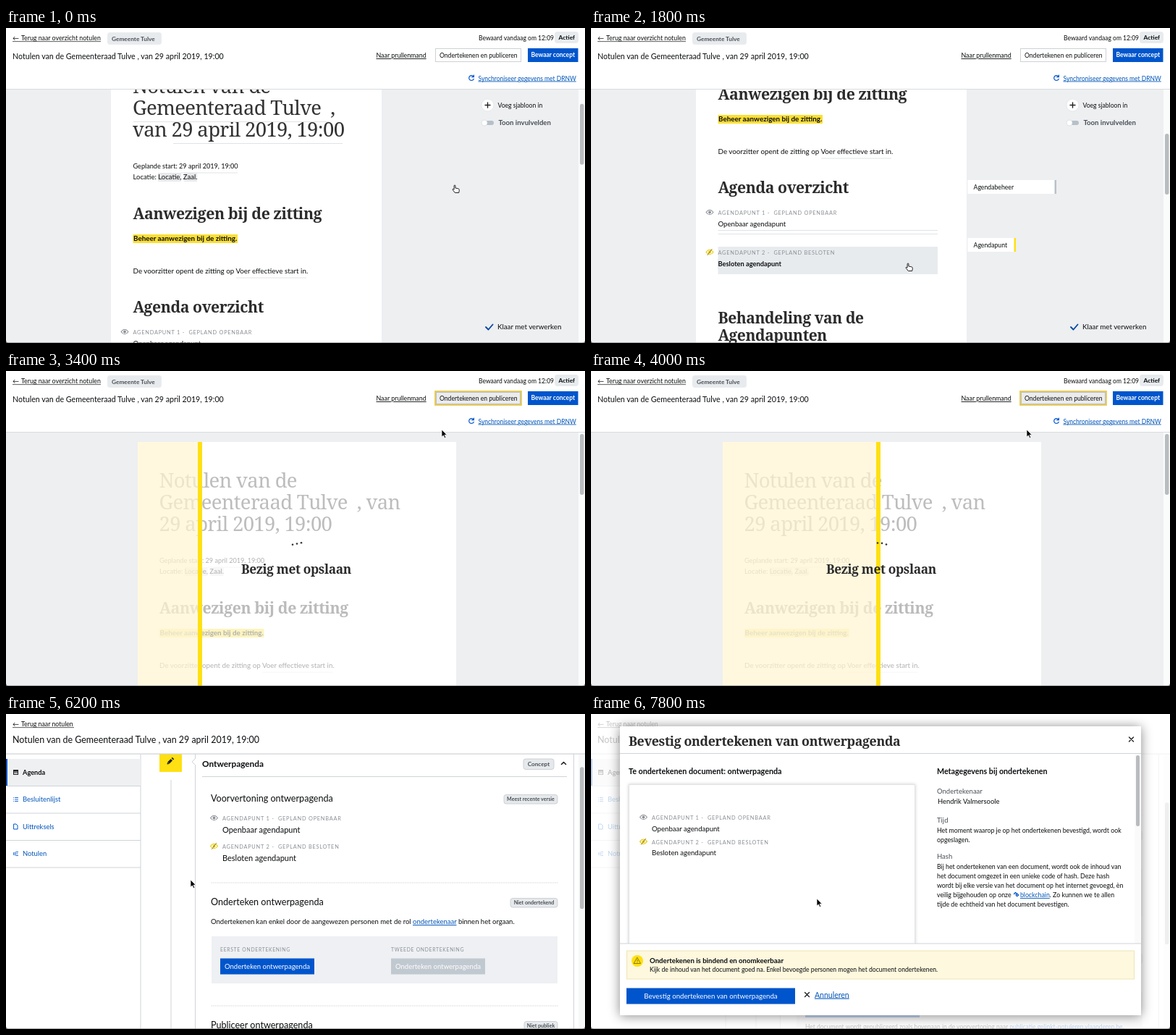
These frames come from a looping animation (800 px wide and 435 px high, 8 s). An HTML page:

```html
<!DOCTYPE html>
<html lang="nl">
<head>
<meta charset="utf-8">
<title>Notulen</title>
<style>
  html, body { margin: 0; width: 100%; height: 100%; overflow: hidden; background: #fff; }
  svg { display: block; width: 100vw; height: 100vh; }
  text { font-family: Lato, sans-serif; fill: #0c0e10; white-space: pre; }
  .b { font-weight: 700; }
  .serif { font-family: "Noto Serif", serif; font-weight: 700; letter-spacing: -.02em; fill: #2b2b2b; }
  .light { font-family: "Noto Serif", serif; font-weight: 200; letter-spacing: -.025em; fill: #333; }
  .caps { font-size: 7.4px; letter-spacing: .75px; fill: #8b9096; }
  .small { font-size: 6.8px; letter-spacing: .7px; }
  .link { fill: #0055b8; }
  .u { text-decoration: underline; }
  .white { fill: #fff; }
  .grey { fill: #4a5056; }
  .line { fill: none; stroke-linecap: round; stroke-linejoin: round; }
</style>
</head>
<body>
<svg id="stage" viewBox="0 0 800 435" preserveAspectRatio="none"></svg>
<script>
const BLUE = '#0055cc', YELLOW = '#ffe012', GREY = '#edeff1', RULE = '#cfd4d9', FIELD = '#dfe3e6';
const LOOP = 8000, STEP = 200;

const text = (x, y, size, str, cls = '') =>
  `<text x="${x}" y="${y}" ${size ? `font-size="${size}"` : ''} class="${cls}">${str}</text>`;
const rect = (x, y, w, h, fill, extra = '') =>
  `<rect x="${x}" y="${y}" width="${w}" height="${h}" fill="${fill}" ${extra}/>`;
const path = (d, stroke, width = 1, extra = '') =>
  `<path class="line" d="${d}" stroke="${stroke}" stroke-width="${width}" ${extra}/>`;
const group = (id, ...parts) => `<g id="${id}">${parts.join('')}</g>`;
const span = (str, cls) => `<tspan class="${cls}">${str}</tspan>`;

const badge = (x, y, w, h, size, str) =>
  rect(x, y, w, h, '#e6e9ec', 'rx="3" stroke="#c3c8cd" stroke-width=".8"') +
  `<text x="${x + w / 2}" y="${y + h / 2 + size * .36}" font-size="${size}" class="b grey" text-anchor="middle">${str}</text>`;
const button = (x, y, w, h, fill, size, str, cls = 'white', id = '') =>
  rect(x, y, w, h, fill, id && `id="${id}"`) +
  `<text x="${x + w / 2}" y="${y + h / 2 + size * .35}" font-size="${size}" class="${cls}" text-anchor="middle">${str}</text>`;
const chevron = (x, y, up, color = '#222') =>
  path(`M${x - 3} ${y + (up ? 1.5 : -1.5)}l3 ${up ? -3 : 3}l3 ${up ? 3 : -3}`, color, 1.6);
const eye = (x, y, color, crossed) =>
  path(`M${x - 5} ${y}q5 -6.5 10 0q-5 6.5 -10 0z`, color, 1.1) +
  `<circle cx="${x}" cy="${y}" r="1.9" fill="${color}"/>` +
  (crossed ? path(`M${x - 3} ${y + 4}l6 -8`, '#7d6c00', .9) : '');
const pencilBox = y => rect(212, y, 31, 30, YELLOW) +
  path(`M224.5 ${y + 17.5}l4.4 -4.4`, '#222', 3.4, 'style="stroke-linecap:butt"') +
  path(`M229.8 ${y + 12.2}l1.2 -1.2`, '#222', 3.4, 'style="stroke-linecap:butt"') +
  `<path d="M222.5 ${y + 19.5}l.6 -3l2.4 2.4z" fill="#222"/>`;
const agendaItems = (x, y, gap, size, spacing) =>
  [['1 -  GEPLAND OPENBAAR', 'Openbaar'], ['2 -  GEPLAND BESLOTEN', 'Besloten']].map(([head, kind], i) =>
    eye(x - 11.5, y - 3.5 + i * spacing, i ? '#e8c800' : '#8b9096', i) +
    text(x, y + i * spacing, 0, 'AGENDAPUNT ' + head, 'caps') +
    text(x, y + gap + i * spacing, size, kind + ' agendapunt')).join('');

// Editor page
const documentBody = [
  group('titleNarrow',
    text(175, 161, 27.5, 'Notulen van de', 'light'),
    text(175, 191, 27.5, 'Gemeenteraad Tulve  ,', 'light'),
    text(175, 221, 27.5, 'van 29 april 2019, 19:00', 'light'),
    rect(176, 200, 271, 1, FIELD), rect(231, 230, 234, 1, FIELD)),
  group('titleWide',
    text(175, 161, 27.5, 'Notulen van de', 'light'),
    text(175, 191, 27.5, 'Gemeenteraad Tulve  , van', 'light'),
    text(175, 221, 27.5, '29 april 2019, 19:00', 'light')),
  text(175.5, 265, 9.15, 'Geplande start: 29 april 2019, 19:00'),
  rect(242, 270.5, 78, 1, FIELD),
  rect(210, 271, 32, 12, '#e6e8ea'), rect(246, 271, 18, 12, '#e6e8ea'),
  text(175.5, 280, 9.5, 'Locatie: Locatie, Zaal.'),
  text(175.5, 335, 21.3, 'Aanwezigen bij de zitting', 'serif'),
  rect(175.5, 356, 144.5, 12, '#fbdf35'),
  text(176, 365, 9.85, 'Beheer aanwezigen bij de zitting.', 'b'),
  text(175.5, 410, 9.8, 'De voorzitter opent de zitting op Voer effectieve start in.'),
  rect(318, 415.5, 97, 1, FIELD),
  text(175.5, 464, 21.2, 'Agenda overzicht', 'serif'),
  rect(175.5, 515, 303.5, 1, FIELD), rect(175.5, 520, 303.5, 1, FIELD),
  rect(175.5, 538, 303.5, 38, '#e8ebee', 'id="rowHover"'),
  agendaItems(175.5, 494, 16, 9.6, 55),
  group('rowBold', rect(175, 555, 100, 14, '#e8ebee'), text(175.5, 565, 9.3, 'Besloten agendapunt', 'b')),
  text(175.5, 644, 21, 'Behandeling van de', 'serif'),
  text(175.5, 668, 21, 'Agendapunten', 'serif')
].join('');

const sideCard = (y, w, str, color) => rect(520.5, y, w, 19, '#fff') +
  text(528.5, y + 12.5, 8.7, str) + rect(520.5 + w - 2, y, 2.5, 19, color);

const editor = group('editor',
  rect(0, 84, 800, 351, GREY),
  `<g id="doc"><rect id="paper" y="98" height="900" fill="#fff"/><g id="docText">${documentBody}</g></g>`,
  group('cards', sideCard(210, 122, 'Agendabeheer', '#b9c2ca'), sideCard(290, 66, 'Agendapunt', YELLOW)),
  group('tools',
    '<circle cx="665.5" cy="106.5" r="8.5" fill="#fff" stroke="#dfe3e6" stroke-width=".7"/>',
    path('M662 106.5h7M665.5 103v7', '#222', 1.4), text(679.5, 110, 8.6, 'Voeg sjabloon in'),
    rect(661, 128, 13, 6, '#b6c0c9', 'rx="3"'),
    '<circle cx="661" cy="131" r="4" fill="#fff" stroke="#d5dade" stroke-width=".7"/>',
    text(680.5, 134, 9.6, 'Toon invulvelden', 'b grey'),
    path('M663 413l3.5 3.5l6 -7', '#0b4aa0', 1.9), text(679, 416, 9.75, 'Klaar met verwerken')),
  group('saving',
    rect(182, 98, 440, 337, '#fff', 'opacity=".68"'),
    '<rect id="tint" x="182" y="98" height="337" fill="#fff5d0" opacity=".7"/>',
    `<rect id="bar" y="98" width="6" height="337" fill="${YELLOW}"/>`,
    ...[0, 1, 2].map(i => `<circle class="dot" cx="${396 + i * 6}" r="1.3" fill="#333"/>`),
    text(325, 280, 17.3, 'Bezig met opslaan', 'serif')),
  rect(791, 85, 9, 350, '#fafbfb'), rect(793, 0, 5.5, 84, '#b9bcbe', 'rx="2.7" id="thumb"'),
  rect(0, 0, 800, 84, '#fff'), rect(0, 84, 800, 1, '#d8dcdf'),
  text(9, 17, 9, '←'), text(21, 17, 8.8, 'Terug naar overzicht notulen'), rect(9, 18.3, 122, .8, '#333'),
  rect(140, 6, 75, 17, '#e8ebee', 'rx="4"'), text(146, 17.5, 8.3, 'Gemeente Tulve', 'b grey'),
  text(9, 43, 10.65, 'Notulen van de Gemeenteraad Tulve , van 29 april 2019, 19:00'),
  text(653, 16.5, 8.55, 'Bewaard vandaag om 12:09'),
  rect(758, 5, 33, 16, '#e8ebee', 'rx="4"'), text(763.5, 16, 8.4, 'Actief', 'b'),
  text(511.5, 41, 8.85, 'Naar prullenmand', 'u'),
  rect(593.5, 28.5, 118, 18, '#fff', 'stroke="#cdd2d6"'),
  group('publishFocus', rect(593, 28, 119, 19, '#ececec', 'stroke="#e5c53a" stroke-width="1.6"'),
    rect(594.5, 29.5, 116, 16, 'none', 'stroke="#b9bec3"')),
  text(599, 40.5, 8.6, 'Ondertekenen en publiceren'),
  button(721, 28, 69.5, 19, BLUE, 8.5, 'Bewaar concept', 'white b'),
  path('M646 67.2a3.4 3.4 0 1 0 .2 3.2M646.4 65v2.7h-2.7', BLUE, 1.2),
  text(652.5, 72.5, 8.5, 'Synchroniseer gegevens met DRNW', 'link u'));

// Agenda page
const menuIcons = y => [
  rect(10.5, y - 3, 6, 6, 'none', 'stroke="#222"') + rect(10, y - 3.5, 7, 2.6, '#222') + rect(11, y, 5, 1, '#222'),
  path(`M12.5 ${y - 2.5}h4M12.5 ${y}h4M12.5 ${y + 2.5}h4M10.3 ${y - 2.5}h.1M10.3 ${y}h.1M10.3 ${y + 2.5}h.1`, BLUE, .9),
  path(`M11 ${y - 3.5}h3l2 2v5h-5z`, BLUE, 1),
  path(`M10.5 ${y - 1.5}v3M12.5 ${y - 2}v4M14 ${y - 2.5}h2.5M14 ${y}h2M14 ${y + 2.5}h2.5`, BLUE, .9)];
const menu = ['Agenda', 'Besluitenlijst', 'Uittreksels', 'Notulen'].map((label, i) => {
  const y = 80.5 + i * 37.5;
  return (i ? '' : rect(0, 62, 186, 37, '#eef0f2') + rect(0, 62, 2, 37, BLUE)) +
    menuIcons(y)[i] + text(23, y + 3.4, i ? 9.4 : 9.2, label, i ? 'link' : 'b') + rect(0, y + 18.5, 186, 1, RULE);
}).join('');

const agendaRow = (label, i) => {
  const y = 81 + i * 52.5;
  return rect(261.5, y, 532, 36.5, '#fff', `stroke="${RULE}"`) +
    `<path d="M262 ${y + 11}l-5 5l5 5" fill="#fff" stroke="${RULE}"/>` +
    pencilBox(y) + (i < 2 ? rect(227.5, y + 40, 1, 8, RULE) : '') +
    text(271, y + 22, 11.8, label, 'b') + badge(724.5, y + 11.5, 42, 14.5, 8.2, 'Concept') +
    (i ? chevron(779.5, y + 18, false) : '');
};
const section = (y, title, x, status, lineY) =>
  text(283, y, 12.6, title) + badge(x, y - 9.5, 762 - x, 12.5, 7.1, status) +
  (lineY ? path(`M284 ${lineY}h478`, '#ccd1d5', 1, 'stroke-dasharray=".5 2"') : '');

const agenda = group('agenda',
  rect(0, 0, 800, 435, '#fff'),
  group('collapsed',
    ...['Ontwerpagenda', 'Aanvullende agenda', 'Spoedeisende agenda'].map(agendaRow),
    group('idleRow', chevron(779.5, 99, false)),
    group('hoverRow', rect(270, 90, 100, 18, '#fff'), text(271, 103, 11.8, 'Ontwerpagenda', 'b link u'),
      chevron(779.5, 99, true, BLUE))),
  group('expanded',
    rect(227.5, 122, 1, 600, RULE), pencilBox(81),
    rect(261.5, 81, 523, 700, '#fff', `stroke="${RULE}"`),
    `<path d="M262 92l-5 5l5 5" fill="#fff" stroke="${RULE}"/>`,
    text(271, 104, 11.8, 'Ontwerpagenda', 'b'), badge(715, 93, 42, 14.5, 8.2, 'Concept'),
    chevron(770.5, 99, true), rect(271, 117, 504, 1, RULE),
    section(152, 'Voorvertoning ontwerpagenda', 688, 'Meest recente versie', 264),
    agendaItems(299, 178, 17, 11, 39),
    section(295, 'Onderteken ontwerpagenda', 697, 'Niet ondertekend', 434),
    text(283, 321, 9.5, 'Ondertekenen kan enkel door de aangewezen personen met de rol ' +
      span('ondertekenaar', 'link u') + ' binnen het orgaan.'),
    rect(284, 338, 478, 65, '#eef0f3'),
    text(296, 359, 0, 'EERSTE ONDERTEKENING', 'caps small'), text(532, 359, 0, 'TWEEDE ONDERTEKENING', 'caps small'),
    button(296, 368.5, 130, 22, BLUE, 9.55, 'Onderteken ontwerpagenda', 'white', 'sign'),
    button(532, 368.5, 130, 22, '#c1c9d0', 9.55, 'Onderteken ontwerpagenda'),
    section(465, 'Publiceer ontwerpagenda', 716, 'Niet publiek'),
    text(283, 491.5, 9.5, 'Publiceren kan enkel door personen met de rol ' + span('publiceerder', 'link u') + '.'),
    rect(284, 508, 478, 150, '#eef0f3'),
    button(296, 521, 158, 22, BLUE, 9.7, 'Publiceer ontwerpagenda'),
    text(296, 558.5, 8.5, 'Het document wordt gepubliceerd zoals bovenaan in de voorvertoning naar ' +
      span('publicatie.gelinkt-notuleren.vlaanderen.be', 'link u') + ',')),
  group('agendaBar', rect(791, 56, 9, 379, '#f7f8f8'),
    rect(793, 57, 5.5, 196, '#b9bcbe', 'rx="2.7" id="agendaThumb"')),
  rect(0, 0, 800, 55, '#fff'), rect(0, 54.5, 800, 1.2, '#cdd2d6'),
  text(9, 17, 9, '←'), text(21, 17, 8.75, 'Terug naar notulen'), rect(9, 18.3, 85, .8, '#333'),
  text(9, 40, 12.45, 'Notulen van de Gemeenteraad Tulve , van 29 april 2019, 19:00'),
  rect(185.5, 56, 1, 379, RULE), menu);

// Confirmation dialog
const lines = (x, y, gap, size, rows) => rows.map((row, i) => text(x, y + i * gap, size, row)).join('');
const modal = group('modal',
  rect(0, 0, 800, 435, '#fff', 'opacity=".76"'),
  rect(40, 17, 720, 399, '#fff', 'style="filter:drop-shadow(0 1px 8px #0007)"'),
  text(52, 43.5, 17.8, 'Bevestig ondertekenen van ontwerpagenda', 'serif'),
  path('M743.5 32l6 6M749.5 32l-6 6', '#222', 1.4), rect(40, 54, 720, 1, RULE),
  text(52, 83, 10.75, 'Te ondertekenen document: ontwerpagenda', 'b'),
  rect(52.5, 97.5, 395, 230, '#fff', 'stroke="#e1e4e6" style="filter:drop-shadow(0 0 2px #0003)"'),
  agendaItems(84, 146, 15.5, 9.6, 33.7),
  text(478, 83, 10.7, 'Metagegevens bij ondertekenen', 'b'),
  text(478, 109.5, 9.5, 'Ondertekenaar', 'grey'), text(479, 124, 9.4, 'Hendrik Valmersoole'),
  text(478, 149.5, 9.5, 'Tijd', 'grey'),
  lines(478, 164, 13, 8.8, ['Het moment waarop je op het ondertekenen bevestigd, wordt ook', 'opgeslagen.']),
  text(478, 199.5, 9.5, 'Hash', 'grey'),
  lines(478, 214, 13, 8.8, ['Bij het ondertekenen van een document, wordt ook de inhoud van',
    'het document omgezet in een unieke code of hash. Deze hash',
    'wordt bij elke versie van het document op het internet gevoegd, èn',
    'veilig bijgehouden op onze <tspan dx="10" class="link u">blockchain</tspan>. Zo kunnen we te allen',
    'tijde de echtheid van het document bevestigen.']),
  path('M584.5 248.5l2 -2l2 2l-1.3 1.3M587 249.5l1.5 2.2l2.2 -1.5l-1.6 -2', BLUE, 1.3),
  rect(751, 55, 8, 262, '#fafafa'), rect(753, 57, 5, 98, '#b9bcbe', 'rx="2.5"'),
  rect(40, 317, 720, 99, '#fff'), rect(40, 316.5, 720, 1, RULE),
  rect(49.5, 327, 701, 39, '#fdf8de', 'stroke="#eee5b5"'),
  `<circle cx="64" cy="341" r="8" fill="${YELLOW}"/>`,
  path('M64 336.5l4.5 8h-9zM64 339.5v2.2M64 343.2v.1', '#8d7a00', 1),
  text(81, 343.5, 9.6, 'Ondertekenen is bindend en onomkeerbaar', 'b'),
  text(81, 355.5, 8.65, 'Kijk de inhoud van het document goed na. Enkel bevoegde personen mogen het document ondertekenen.'),
  button(49, 378.5, 233, 22, BLUE, 9.7, 'Bevestig ondertekenen van ontwerpagenda'),
  path('M295.5 384.5l6 6M301.5 384.5l-6 6', '#222', 1.4), text(309, 391.5, 10.5, 'Annuleren', 'link u'));

const pointer = group('pointer',
  '<path id="arrow" d="M0 0v10l2.4 -2.1l1.7 3.6l1.6 -.8l-1.7 -3.5h3.2z" fill="#000" stroke="#fff" stroke-width=".7"/>',
  '<path id="hand" d="M-.9 1q0 -1 .9 -1t.9 1v3l3.9 .8q1.7 .4 1.5 2l-.6 3.7h-5.4l-3.2 -4.2q-.3 -1.2 1 -.9l1 .8z" ' +
  'fill="#fff" stroke="#222" stroke-width="1"/>');
const corners = '<path d="M0 431q0 4 4 4h-4zM800 431q0 4 -4 4h4z" fill="#444"/>' + rect(0, 434.4, 800, .6, '#777');

const stage = document.getElementById('stage');
stage.innerHTML = editor + agenda + modal + pointer + corners;
const el = id => document.getElementById(id);
const show = (id, on) => el(id).style.display = on ? '' : 'none';
const set = (id, attrs) => Object.entries(attrs).forEach(([k, v]) => el(id).setAttribute(k, v));
const dots = document.querySelectorAll('.dot');

// Eased interpolation through [time, ...values] keys
function track(keys, t) {
  const i = keys.findIndex(k => k[0] > t);
  if (i === 0) return keys[0].slice(1);
  if (i < 0) return keys[keys.length - 1].slice(1);
  const [a, b] = [keys[i - 1], keys[i]], p = (t - a[0]) / (b[0] - a[0]), e = p * p * (3 - 2 * p);
  return a.slice(1).map((v, n) => v + (b[n + 1] - v) * e);
}
const pointerPath = [[200, 620, 217], [1200, 438, 325], [1800, 438, 325], [2400, 652, 36], [2800, 652, 36],
  [3400, 602, 81], [4200, 602, 81], [4800, 303, 97], [5200, 303, 97], [5800, 255, 229], [6200, 255, 229],
  [7000, 310, 254], [7400, 312, 255]];

function draw(t) {
  const saving = t >= 2600, onAgenda = t >= 4200, open = t >= 5200, hovering = t >= 1200 && t <= 2000;
  show('editor', !onAgenda);
  show('agenda', onAgenda);

  const [scroll] = saving ? [0] : track([[200, 71], [1200, 236]], t);
  set('doc', { transform: `translate(0 ${-scroll})` });
  set('docText', { transform: `translate(${saving ? 36.5 : 0} 0)` });
  set('paper', { x: saving ? 182 : 145, width: saving ? 440 : 374 });
  set('thumb', { y: 87 + scroll * .25 });
  show('publishFocus', saving);
  show('titleNarrow', !saving);
  show('titleWide', saving);
  show('tools', !saving);
  show('saving', saving);
  show('cards', !saving && t >= 1200);
  show('rowHover', hovering);
  show('rowBold', hovering);

  const progress = Math.max(0, (t - 3000) * .215);
  set('tint', { width: progress });
  set('bar', { x: 179 + progress });
  dots.forEach((dot, i) => dot.setAttribute('cy', 238.5 + 1.2 * Math.cos((t - 3400) / 160 - i * 1.6)));

  const [agendaScroll] = track([[5600, 0], [6000, 31], [6200, 31], [7000, 124]], t);
  show('collapsed', !open);
  show('expanded', open);
  show('agendaBar', open);
  show('idleRow', t < 4800);
  show('hoverRow', t >= 4800);
  set('expanded', { transform: `translate(0 ${-agendaScroll})` });
  set('agendaThumb', { y: 57 + agendaScroll * .526 });
  set('sign', { fill: t >= 7000 ? '#1f6fd2' : BLUE });

  show('modal', t >= 7400);
  set('modal', { opacity: t < 7600 ? .5 : 1 });

  const [x, y] = track(pointerPath, t);
  const hand = t < 3000 || (t >= 4800 && t < 5400) || (t >= 6800 && t < 7400);
  set('pointer', { transform: `translate(${x} ${y})` });
  show('hand', hand);
  show('arrow', !hand);
}

function tick() {
  draw(Math.floor(performance.now() % LOOP / STEP) * STEP);
  requestAnimationFrame(tick);
}
tick();
</script>
</body>
</html>
```
